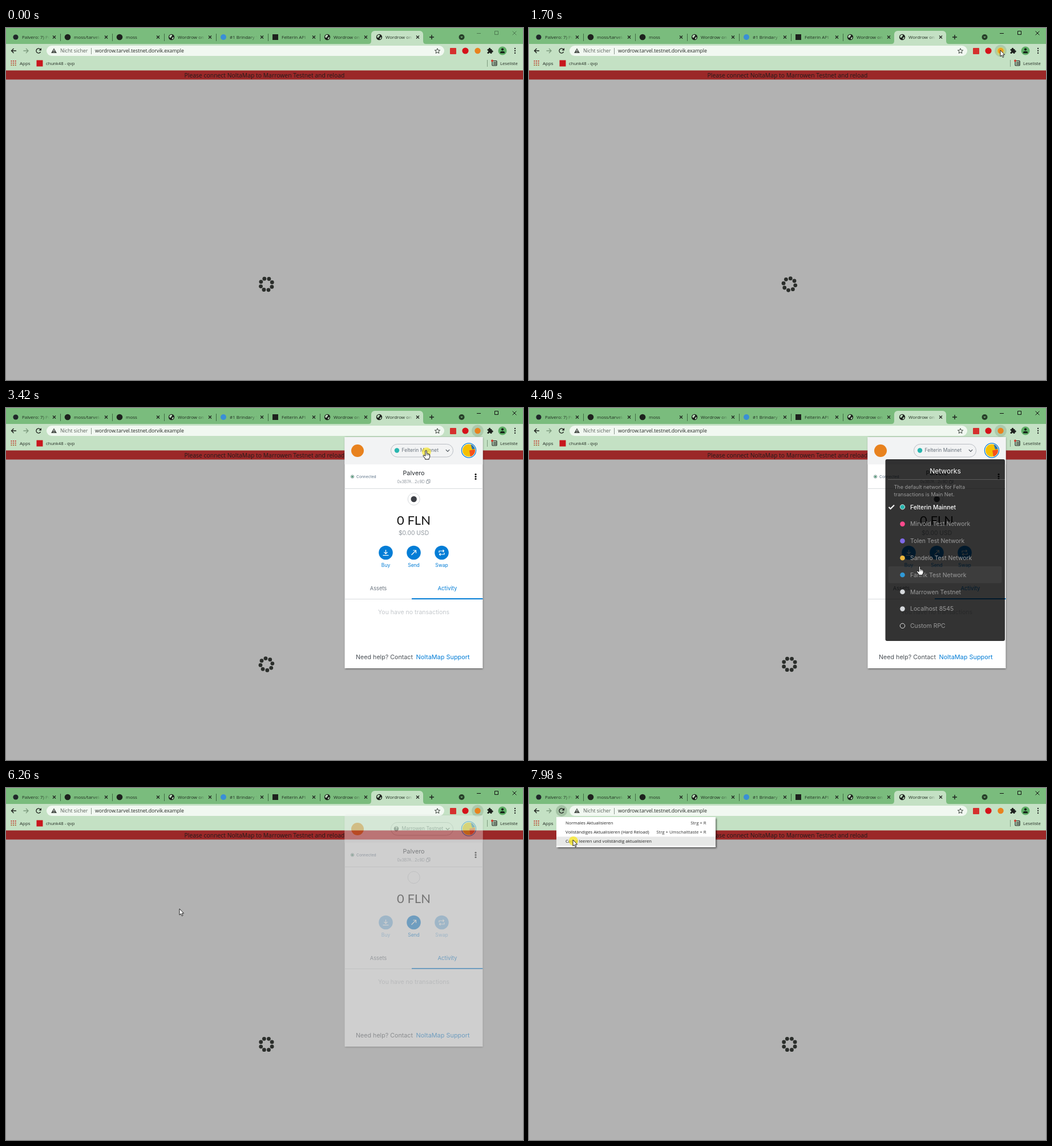
Animation of 906 by 618 pixels, one loop 8000 ms. Source, as an HTML page with a canvas:

```html
<!DOCTYPE html>
<html lang="de">
<head>
<meta charset="utf-8">
<title>Wallet network switch</title>
<style>
html, body { margin: 0; width: 100%; height: 100%; overflow: hidden; background: #b2b2b2; }
canvas { display: block; width: 906px; height: 618px; }
</style>
</head>
<body>
<canvas id="stage" width="906" height="618"></canvas>
<script>
const LOOP = 8000;
const UI = '"Open Sans", "Noto Sans", sans-serif';
const APP = 'Inter, Roboto, sans-serif';
const INK = '#1d211d', BAR = '#c4e1c4', STRIP = '#7abc7d', BLUE = '#037dd6', ORANGE = '#e8821e';

const stage = document.getElementById('stage').getContext('2d');
const layer = document.createElement('canvas');
layer.width = 906;
layer.height = 618;
const layerCtx = layer.getContext('2d');
let g = stage;

// ---------- drawing helpers ----------
function box(x, y, w, h, fill, r = 0) {
  g.beginPath();
  g.roundRect(x, y, w, h, r);
  g.fillStyle = fill;
  g.fill();
}
function frame(x, y, w, h, color, r = 0, width = 1) {
  g.beginPath();
  g.roundRect(x, y, w, h, r);
  g.strokeStyle = color;
  g.lineWidth = width;
  g.stroke();
}
function disc(x, y, r, fill) {
  g.beginPath();
  g.arc(x, y, r, 0, Math.PI * 2);
  g.fillStyle = fill;
  g.fill();
}
function ring(x, y, r, color, width = 1, from = 0, to = Math.PI * 2) {
  g.beginPath();
  g.arc(x, y, r, from, to);
  g.strokeStyle = color;
  g.lineWidth = width;
  g.stroke();
}
function trace(d, x, y) {
  g.save();
  g.translate(x, y);
  return new Path2D(d);
}
function stroke(d, x, y, color, width = 1.2) {
  const p = trace(d, x, y);
  g.strokeStyle = color;
  g.lineWidth = width;
  g.stroke(p);
  g.restore();
}
function shape(d, x, y, fill, edge, width = 1) {
  const p = trace(d, x, y);
  g.fillStyle = fill;
  g.fill(p);
  if (edge) {
    g.strokeStyle = edge;
    g.lineWidth = width;
    g.stroke(p);
  }
  g.restore();
}
function text(s, x, y, size, color, align = 'left', font = UI, weight = 400) {
  g.font = `${weight} ${size}px ${font}`;
  g.textAlign = align;
  g.fillStyle = color;
  g.fillText(s, x, y);
}
function shadow(color, blur, dy = 0, dx = 0) {
  g.shadowColor = color;
  g.shadowBlur = blur;
  g.shadowOffsetY = dy;
  g.shadowOffsetX = dx;
}

// ---------- timing helpers ----------
const clamp = v => Math.max(0, Math.min(1, v));
const ramp = (t, a, b) => clamp((t - a) / (b - a));
const smooth = u => u * u * (3 - 2 * u);
function sample(keys, t, col, ease = u => u) {
  let i = 0;
  while (i < keys.length - 2 && t >= keys[i + 1][0]) i++;
  const a = keys[i], b = keys[i + 1];
  return a[col] + (b[col] - a[col]) * ease(ramp(t, a[0], b[0]));
}

// time, x, y of the pointer tip
const PATH = [
  [60, -14, 140], [360, 235, 157], [520, 235, 157], [820, 440, 213], [1300, 822, 84],
  [1540, 826, 39], [2620, 826, 39], [3220, 738, 74], [3560, 735, 76], [4120, 700, 170],
  [4400, 684.5, 278.5], [4780, 690, 318], [5240, 690, 318], [5740, 646, 293], [5840, 644, 292],
  [6130, 304, 212], [6330, 304, 212], [6640, 120, 120], [6960, 57, 39], [7420, 57, 40],
  [7800, 77, 91], [8000, 77, 91]
];
const CLICKS = [440, 1620, 3440, 5070, 6130, 7160, 7980];
// time, eighths of a turn
const SPIN = [
  [0, 0.55], [1700, 14.22], [2480, 20.44], [4400, 35.51],
  [5750, 45.89], [6260, 50.49], [7980, 64.49], [8000, 64.65]
];

const TABS = [
  ['Palvero: 7) Pos', 'ring'], ['moss/tarvel-', 'disc'], ['moss', 'disc'], ['Wordrow on', 'globe'],
  ['#1 Brindary Tu', 'link'], ['Felterin API', 'square'], ['Wordrow on', 'globe'], ['Wordrow on', 'globe']
];
const NETWORKS = [
  ['Felterin Mainnet', '#29b6af'], ['Mirvold Test Network', '#ff4a8d'], ['Tolen Test Network', '#7f6ae8'],
  ['Sandelo Test Network', '#ebb73d'], ['Fanrik Test Network', '#3099d6'], ['Marrowen Testnet', '#d6d9dc'],
  ['Localhost 8545', '#d6d9dc'], ['Custom RPC', null]
];

// ---------- browser ----------
function tabIcon(kind, x, y) {
  if (kind === 'ring') disc(x, y, 4.6, '#20282a');
  if (kind === 'disc') disc(x, y, 5.3, INK);
  if (kind === 'link') disc(x, y, 5, '#3a8fd6');
  if (kind === 'square') box(x - 5, y - 5, 10, 10, INK);
  if (kind === 'globe') {
    disc(x, y, 5.2, INK);
    shape('M-4 -1L-2 -4L1 -4L1 -2L-1 0L-1 1L-3 1ZM1 1L4 0L3 3L1 4Z', x, y, '#b9d9ba');
  }
}
function cross(x, y, r, color, width) {
  stroke(`M${-r} ${-r}L${r} ${r}M${r} ${-r}L${-r} ${r}`, x, y, color, width);
}
function drawTabs(focused) {
  box(0, 0, 906, 28, STRIP);
  box(640, 5, 91, 30, BAR, 6);
  shape('M-5 0Q0 0 0 -5L0 0Z', 640, 28, BAR);
  shape('M5 0Q0 0 0 -5L0 0Z', 731, 28, BAR);
  TABS.forEach(([title, icon], i) => {
    const x = 4 + i * 91;
    tabIcon(icon, x + 13, 16);
    const fade = g.createLinearGradient(x + 58, 0, x + 73, 0);
    fade.addColorStop(0, '#1d2b1e');
    fade.addColorStop(1, 'rgba(29,43,30,0)');
    text(title, x + 24, 19, 8, fade);
    cross(x + 80.5, 16, 2.5, INK, 1.2);
    if (i < 6) box(x + 91, 10, 1, 13, '#3f6a42');
  });
  stroke('M-4 0H4M0 -4V4', 746, 16, INK, 1.4);
  disc(798.5, 16, 5, '#27402a');
  shape('M-2.3 -1H2.3L0 1.6Z', 798.5, 16, STRIP);
  const ctl = focused ? '#111' : '#4d7a50';
  box(825, 9, 7, 1, ctl);
  frame(856.5, 5.5, 6, 6, ctl);
  cross(891, 9, 3.4, ctl, 1);
}
function drawToolbar(foxHover, reloadHover) {
  box(0, 28, 906, 47, BAR);
  stroke('M4.5 0H-4M0 -4L-4 0L0 4', 13.5, 40, INK, 1.4);
  stroke('M-4.5 0H4M0 -4L4 0L0 4', 35, 40, '#7c9a7d', 1.3);
  if (reloadHover) disc(57, 40, 10, 'rgba(40,70,40,.2)');
  ring(57, 40, 4, INK, 1.4, 0.5, 5.6);
  shape('M5 -5V-0.5H0.5Z', 57, 40, INK);

  box(71, 31, 697, 18, '#f1f8f1', 9);
  shape('M0 -4.5L5 4H-5Z', 84, 40, '#4a4f4a');
  box(83.5, 38, 1, 3, '#fff');
  box(83.5, 42, 1, 1, '#fff');
  text('Nicht sicher', 95, 43.2, 8.8, '#59605a');
  box(149, 35, 1, 11, '#8b968c');
  text('wordrow.tarvel.testnet.dorvik.example', 156, 43.2, 8.7, '#222622');
  stroke('M0 -4.5L1.3 -1.4L4.6 -1.2L2 .9L2.9 4.1L0 2.3L-2.9 4.1L-2 .9L-4.6 -1.2L-1.3 -1.4Z', 756, 40.3, '#3b413c', 1);

  box(778, 35, 11, 11, '#d5302e', 1);
  disc(805, 40, 5.6, '#d5121a');
  if (foxHover) disc(826.5, 40, 10.5, 'rgba(50,90,50,.16)');
  disc(826.5, 40, 5.2, ORANGE);
  box(843.5, 37, 8, 8, INK, 1);
  disc(847.5, 36.5, 1.7, INK);
  disc(852, 41, 1.7, INK);
  disc(843.8, 41, 1.4, BAR);
  disc(847.5, 44.8, 1.4, BAR);
  disc(870, 40, 7.5, '#5eae66');
  disc(870, 37.6, 2.1, '#152017');
  shape('M-4 4.2V3Q-4 .8 0 .8Q4 .8 4 3V4.2Z', 870, 40, '#152017');
  for (const dy of [-4, 0, 4]) disc(892, 40 + dy, 1.15, INK);

  for (let i = 0; i < 9; i++) {
    box(8.5 + (i % 3) * 3.6, 57 + Math.floor(i / 3) * 3.6, 2, 2, i < 6 ? '#c2483a' : '#a86a35');
  }
  text('Apps', 24, 64.8, 8, '#222b23');
  box(53.5, 56.5, 11, 11, '#c8161d');
  text('chunk48 - qvp', 70, 64.8, 7.7, '#222b23');
  box(843, 56, 1, 12, '#7d9b7e');
  frame(852, 57.5, 8, 8.5, INK, 1, 1.2);
  stroke('M-2 -2H3M-2 0H3M-2 2H3', 856, 62, INK, 1);
  disc(852, 57.5, 1.9, '#d23a2c');
  text('Leseliste', 866, 64.8, 7.7, '#222b23');
}
function drawPage(t) {
  box(0, 75, 906, 543, '#b2b2b2');
  box(0, 74.5, 906, 16, '#9b2828');
  text('Please connect NoltaMap to Marrowen Testnet and reload', 453, 87, 10.4, '#211c1c', 'center');
  const turn = sample(SPIN, t, 1);
  for (let i = 0; i < 8; i++) {
    const a = (turn + i) * Math.PI / 4 - Math.PI / 2;
    disc(456.4 + Math.cos(a) * 10.5, 450 + Math.sin(a) * 10.5, 3.4, '#2b2e2b');
  }
}
function drawReloadMenu(y) {
  g.save();
  shadow('rgba(0,0,0,.6)', 3, 1.5, 1.5);
  box(48, 51, 279, 53, '#fff');
  g.restore();
  const row = Math.floor((y - 53) / 16.2);
  if (row >= 0 && row < 3) box(48, 53 + row * 16.2, 279, 16.2, '#e7e8e7');
  text('Normales Aktualisieren', 64, 63.8, 7.7, '#222');
  text('Strg + R', 310.5, 63.8, 7.7, '#333', 'right');
  text('Vollständiges Aktualisieren (Hard Reload)', 64, 80, 7.7, '#222');
  text('Strg + Umschalttaste + R', 310.5, 80, 7.7, '#333', 'right');
  text('Cache leeren und vollständig aktualisieren', 64, 96.2, 7.7, '#222');
}

// ---------- wallet ----------
function action(x, y, label, icon, soft) {
  const color = soft ? '#81beeb' : BLUE;
  disc(x, y, 12.3, color);
  stroke(icon, x, y, '#fff', 1.2);
  text(label, x, y + 25, 8.5, color, 'center', APP);
}
function drawWallet(test, ready) {
  g.save();
  shadow('rgba(0,0,0,.55)', 3, 1);
  box(593.5, 51, 242, 406, '#fff');
  g.restore();
  box(593.5, 51, 242, 48, '#f2f3f4');
  disc(616, 75, 11, ORANGE);

  frame(674.5, 63.5, 109, 22.5, '#b9bdc3', 11.2);
  if (test) {
    disc(684, 74.5, 4.2, '#535a61');
    text('?', 684, 77, 7, '#fff', 'center', APP, 700);
  } else {
    disc(685, 74.5, 4.2, ready ? '#29b6af' : '#2480c6');
  }
  text(test ? 'Marrowen Testnet' : 'Felterin Mainnet', 693.5, 77.4, 8.5, '#6a737d', 'left', APP);
  stroke('M-3.2 -1.6L0 1.6L3.2 -1.6', 774, 74.8, '#4d545b', 1.2);

  disc(811, 74.5, 13.2, BLUE);
  disc(811, 74.5, 11.9, '#fff');
  g.save();
  g.beginPath();
  g.arc(811, 74.5, 11, 0, Math.PI * 2);
  g.clip();
  box(799, 62, 24, 25, '#f5c000');
  shape('M1 0L12 -2V12H3Z', 811, 74.5, '#f5501b');
  shape('M3 -12L13 -10V-3L6 -2Z', 811, 74.5, '#2a6fb0');
  g.restore();

  ring(607, 120.5, 2.7, '#6b8f86', 0.9);
  disc(607, 120.5, 1.6, '#3c8a66');
  text('Connected', 614, 122.8, 6.7, '#5d7388', 'left', APP);
  text('Palvero', 714.5, 118, 10.8, '#24292e', 'center', APP);
  text('0x3B7A...2c9D', 685.5, 132, 6.9, '#8b939b', 'left', APP);
  frame(736.5, 127.5, 4.5, 5, '#8b939b', 1, 0.9);
  stroke('M0 0V-1.5H5V4H3.5', 738, 127.2, '#8b939b', 0.9);
  for (const dy of [-4, 0, 4]) disc(823, 120.5 + dy, 1.6, '#111');
  box(593.5, 141, 242, 1, '#d8dbde');

  ring(714.7, 160, 10.5, '#d6d9dc', 1);
  if (!test) disc(714.7, 160, 5.2, '#3c3f45');
  text('0 FLN', 714.5, 204.6, 22, '#111', 'center', 'Lato, "Open Sans", sans-serif');
  if (!test) text('$0.00 USD', 714.5, 223, 10.3, '#8f969d', 'center', APP);

  const up = test ? 15 : 0;
  action(665.5, 254 - up, 'Buy', 'M0 -5V2M-3 -1L0 2L3 -1M-5 4.7H5', test);
  action(714.5, 254 - up, 'Send', 'M-4 4L4 -4M-1 -4H4V1', false);
  action(763.5, 254 - up, 'Swap', 'M-4.5 0V-3H4M2 -5L4 -3L2 -1M4.5 0V3H-4M-2 1L-4 3L-2 5', test);
  text('Assets', 652.5, 320 - up, 9.3, '#6a737d', 'center', APP);
  text('Activity', 773.5, 320 - up, 9.6, BLUE, 'center', APP);
  box(593.5, 335 - up, 242, 1, '#d8dbde');
  box(711, 334 - up, 124.5, 2, BLUE);
  text('You have no transactions', 714.5, 361.8 - up, 10.5, '#c4c8cc', 'center', APP);
  text('Need help? Contact', 613, 440.6, 10.7, '#4a5056', 'left', APP);
  text('NoltaMap Support', 718.5, 440.6, 10.9, BLUE, 'left', APP);
}
function drawNetworks(pointerY) {
  box(624.5, 90, 209.5, 319, 'rgba(0,0,0,.8)', 3);
  text('Networks', 729.5, 114.5, 12, '#fff', 'center', APP);
  box(629, 125, 205, 1, '#5c5c5c');
  text('The default network for Felta', 639.5, 142, 9.1, '#9b9b9b', 'left', APP);
  text('transactions is Main Net.', 639.5, 154.8, 9.1, '#9b9b9b', 'left', APP);
  NETWORKS.forEach(([name, color], i) => {
    const y = 173.8 + i * 29.8;
    if (pointerY >= y - 15 && pointerY < y + 14.8) box(629.5, y - 15, 199, 29.5, 'rgba(255,255,255,.05)', 3);
    if (color) disc(654.5, y, 4.3, color);
    if (!i || !color) ring(654.5, y, 4.2, '#e4e4e4', 1);
    text(name, 668, y + 3.8, 10.4, i ? '#9b9b9b' : '#fff', 'left', APP, i ? 400 : 500);
  });
  stroke('M-4.5 0L-1.5 3L5 -3.5', 635, 174, '#fff', 2);
}

// ---------- pointer ----------
function drawPointer(t, x, y) {
  if (t < 60) return;
  for (const c of CLICKS) {
    const a = 0.75 * clamp(1 - Math.abs(t - c) / 130);
    if (a > 0) disc(x + 0.8, y + 2, 8, `rgba(250,232,30,${a})`);
  }
  const hand = t > 3080 && t < 5900;
  if (hand) {
    shape('M-1.3 0Q0 -1.2 1.2 0V4.6Q2.6 4 3.3 5Q4.8 4.6 5.2 5.8Q6.6 5.6 6.6 7.2V10Q6.4 12.2 5.2 13.2V14.8H-1.6V13.4L-5 9Q-5.4 7.2 -3.4 7.6L-1.3 9Z',
      x, y, '#fff', '#111', 1);
    stroke('M1.2 5V8M3.3 5.4V8M5.2 6V8', x, y, '#111', 0.7);
  } else {
    shape('M0 0V11L2.5 8.7L4.2 12.6L6 11.8L4.3 8H7.6Z', x, y, '#fff', '#111', 0.9);
  }
}

function drawWalletLayer(t, pointerY) {
  const alpha = ramp(t, 2430, 2520) * (1 - ramp(t, 6205, 6295));
  if (alpha <= 0) return;
  g = layerCtx;
  g.clearRect(0, 0, 906, 618);
  drawWallet(t >= 5110, t > 2600);
  const open = ramp(t, 3470, 3600) * (1 - ramp(t, 5090, 5170));
  if (open > 0) {
    g.globalAlpha = open;
    drawNetworks(pointerY);
    g.globalAlpha = 1;
  }
  g = stage;
  g.globalAlpha = alpha;
  g.drawImage(layer, 0, -Math.round(7 * (1 - alpha) ** 2));
  g.globalAlpha = 1;
}

function render(t) {
  const x = sample(PATH, t, 1, smooth), y = sample(PATH, t, 2, smooth);
  drawTabs(t >= 300);
  drawToolbar(t > 1480 && t < 6700, t > 6900);
  drawPage(t);
  drawWalletLayer(t, y);
  if (t > 7320) drawReloadMenu(y);
  drawPointer(t, x, y);
}

const start = performance.now();
function tick() {
  render((performance.now() - start) % LOOP);
  requestAnimationFrame(tick);
}
tick();
</script>
</body>
</html>
```
